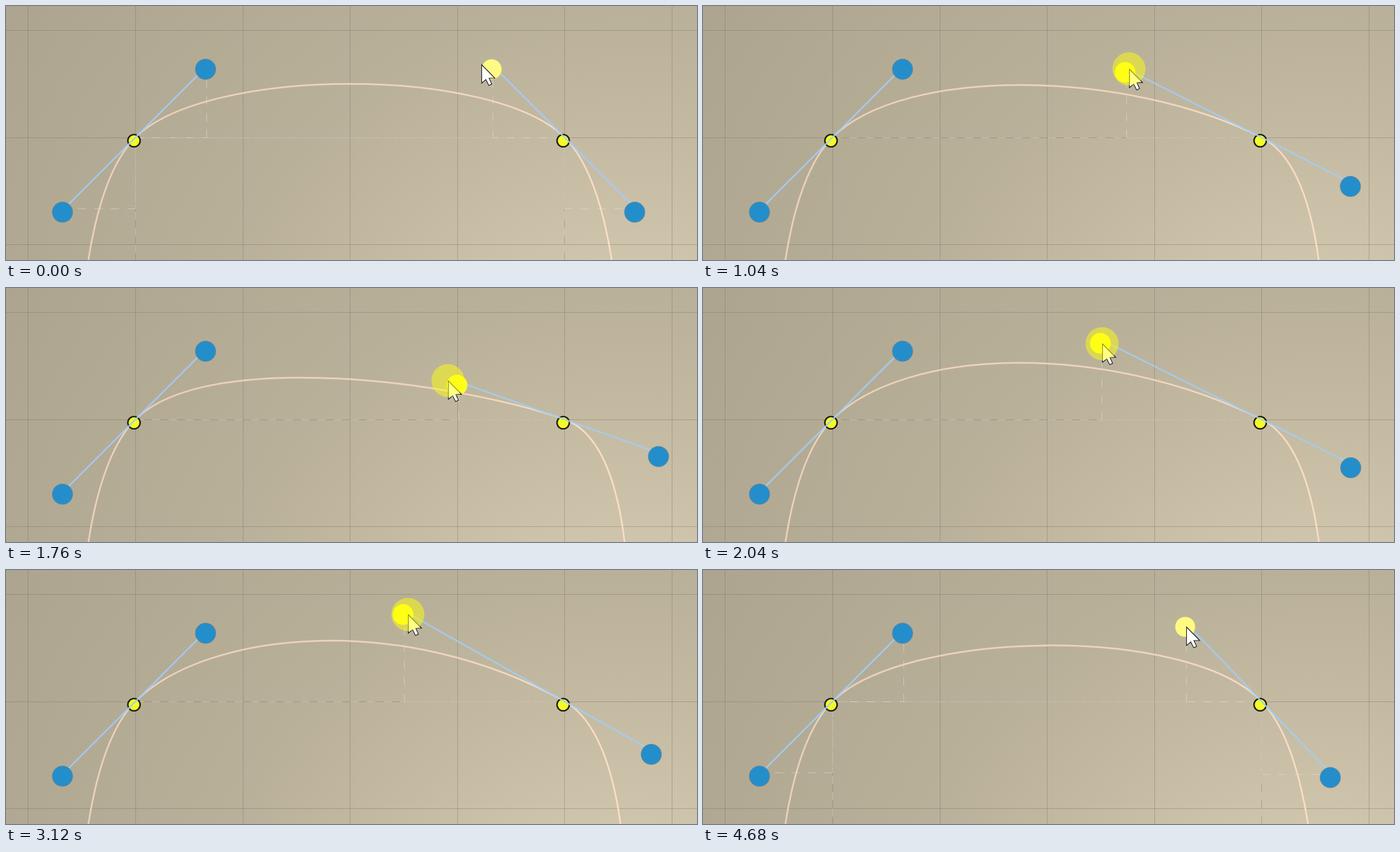
Recreate the animation shown at these times as an HTML page with a canvas. Size 1234 by 454 pixels, loop 5040 ms.

```html
<!DOCTYPE html>
<html lang="en">
<head>
<meta charset="utf-8">
<title>Bezier handle drag</title>
<style>
html, body { margin: 0; width: 100%; height: 100%; overflow: hidden; background: #bcb39b; }
canvas { display: block; }
</style>
</head>
<body>
<canvas id="stage" width="1234" height="454"></canvas>
<script>
const ctx = document.getElementById('stage').getContext('2d');
const W = 1234, H = 454, LOOP = 5040, STEP = 40;
const PRESS = 360, RELEASE = 4680;
const CELL = 191.6, REACH = CELL * 2 / 3, ARM = REACH * Math.SQRT2;

const pt = (x, y) => ({ x, y });
const add = (a, x, y) => pt(a.x + x, a.y + y);

const left = pt(231.2, 235);
const right = add(left, CELL * 4, 0);
const leftLow = add(left, 0, CELL * 4);
const rightLow = add(right, 0, CELL * 4);
const leftUp = add(left, REACH, -REACH);
const leftDown = add(left, -REACH, REACH);

// Turning points of the drag: time, x, y
const turns = [
  [360, 874, 110], [560, 844, 143], [600, 843, 143], [720, 797, 171],
  [880, 748, 138], [1200, 790, 100], [1460, 897, 156], [1700, 815, 175],
  [1980, 711, 99], [2040, 713, 100], [2500, 644, 81], [2680, 632, 104],
  [2880, 640, 145], [3080, 711, 80], [3120, 718, 80], [3200, 857, 75],
  [3440, 862, 75], [3640, 864, 101], [3960, 863, 102]
];

const secant = (a, b, axis) => (b[axis] - a[axis]) / (b[0] - a[0]);

// Harmonic mean of the neighbouring slopes, level at every reversal
function slope(i, axis) {
  if (i === 0 || i === turns.length - 1) return 0;
  const p = secant(turns[i - 1], turns[i], axis);
  const q = secant(turns[i], turns[i + 1], axis);
  return p * q > 0 ? 2 * p * q / (p + q) : 0;
}

function along(t, axis) {
  const i = turns.findIndex(k => k[0] > t) - 1;
  if (i === -2) return turns[turns.length - 1][axis];
  if (i === -1) return turns[0][axis];
  const a = turns[i], b = turns[i + 1];
  const d = b[0] - a[0], u = (t - a[0]) / d, v = 1 - u;
  return a[axis] * (1 + 2 * u) * v * v + b[axis] * (3 - 2 * u) * u * u +
    d * u * v * (slope(i, axis) * v - slope(i + 1, axis) * u);
}

const pointerAt = t => t < STEP ? pt(849, 105) : pt(along(t, 1), along(t, 2));

// The handle trails the pointer by one step
const handleAt = t => t <= PRESS
  ? add(right, -REACH, -REACH)
  : add(pointerAt(t - STEP), 0.7, -6.2);

// The opposite handle keeps its length and mirrors the direction
function mirrored(h) {
  const dx = right.x - h.x, dy = right.y - h.y, k = ARM / Math.hypot(dx, dy);
  return add(right, dx * k, dy * k);
}

function line(a, b) {
  ctx.beginPath();
  ctx.moveTo(a.x, a.y);
  ctx.lineTo(b.x, b.y);
  ctx.stroke();
}

function disc(c, r, fill, edge, width) {
  ctx.beginPath();
  ctx.arc(c.x, c.y, r, 0, Math.PI * 2);
  ctx.fillStyle = fill;
  ctx.fill();
  if (edge) {
    ctx.strokeStyle = edge;
    ctx.lineWidth = width;
    ctx.stroke();
  }
}

function background() {
  const g = ctx.createRadialGradient(1110, 760, 0, 1110, 760, 1404);
  g.addColorStop(0.22, '#cfc4ac');
  g.addColorStop(0.38, '#c4baa2');
  g.addColorStop(0.55, '#b9b099');
  g.addColorStop(1, '#aca38f');
  ctx.fillStyle = g;
  ctx.fillRect(0, 0, W, H);
  ctx.fillStyle = 'rgba(112, 106, 94, 0.42)';
  for (let x = 39.8; x < W; x += CELL) ctx.fillRect(Math.floor(x), 0, 1, H);
  for (let y = 43.4; y < H; y += CELL) ctx.fillRect(0, Math.floor(y), W, 1);
}

const snap = p => pt(Math.floor(p.x) + 0.5, Math.floor(p.y) + 0.5);

// Dashed chord of a segment with the handle's drop onto it
function guide(handle, own, other) {
  const foot = own.x === other.x ? pt(own.x, handle.y) : pt(handle.x, own.y);
  ctx.strokeStyle = 'rgba(240, 236, 224, 0.5)';
  ctx.lineWidth = 1;
  ctx.setLineDash([14.7, 14.8]);
  line(snap(other), snap(own));
  line(snap(own), snap(foot));
  line(snap(foot), snap(handle));
  ctx.setLineDash([]);
}

function curve(up, down) {
  const to = (a, b, c) => ctx.bezierCurveTo(a.x, a.y, b.x, b.y, c.x, c.y);
  ctx.beginPath();
  ctx.moveTo(leftLow.x, leftLow.y);
  to(add(leftLow, -REACH, -REACH), leftDown, left);
  to(leftUp, up, right);
  to(down, add(rightLow, REACH, -REACH), rightLow);
  const g = ctx.createLinearGradient(150, 0, 1100, 300);
  g.addColorStop(0, '#ebcfba');
  g.addColorStop(0.6, '#efd3bd');
  g.addColorStop(1, '#fbdcc5');
  ctx.strokeStyle = g;
  ctx.lineWidth = 3;
  ctx.stroke();
}

const knob = p => add(p, -2.6, 5.8);
const anchor = p => disc(knob(p), 11, '#f4fb28', '#1d1c14', 2.6);
const blueKnob = p => disc(knob(p), 18.2, '#248ecb', 'rgba(100, 130, 145, 0.7)', 1.2);

function cursor(p) {
  const shape = [[0, 0], [0, 33], [7.5, 26.5], [12.8, 37], [18, 34.6], [13.2, 24], [23.5, 24]];
  ctx.beginPath();
  shape.forEach(([x, y]) => ctx.lineTo(p.x + x + 0.5, p.y + y));
  ctx.closePath();
  ctx.fillStyle = '#fff';
  ctx.fill();
  ctx.strokeStyle = '#111';
  ctx.lineWidth = 1.2;
  ctx.stroke();
}

function draw(t) {
  const pressed = t >= PRESS && t < RELEASE;
  const up = handleAt(t), down = mirrored(up), pointer = pointerAt(t);

  background();
  guide(up, right, left);
  if (!pressed) {
    guide(leftUp, left, right);
    guide(leftDown, left, leftLow);
    guide(down, right, rightLow);
  }
  curve(up, down);
  anchor(left);
  anchor(right);

  ctx.strokeStyle = 'rgba(160, 207, 246, 0.92)';
  ctx.lineWidth = 2.6;
  for (const [a, b, c] of [[leftUp, left, leftDown], [up, right, down]]) {
    line(a, b);
    line(b, c);
  }

  [leftUp, leftDown, down].forEach(blueKnob);
  if (pressed) disc(knob(up), 18.5, '#ffff22');
  else disc(knob(up), 18.2, '#fffa83', 'rgba(190, 184, 120, 0.7)', 1);

  cursor(pointer);
  if (pressed) disc(add(pointer, -0.3, -0.6), 29.5, 'rgba(255, 255, 10, 0.5)');
}

function tick(now) {
  draw(Math.floor(now % LOOP / STEP) * STEP);
  requestAnimationFrame(tick);
}
draw(0);
requestAnimationFrame(tick);
</script>
</body>
</html>
```
